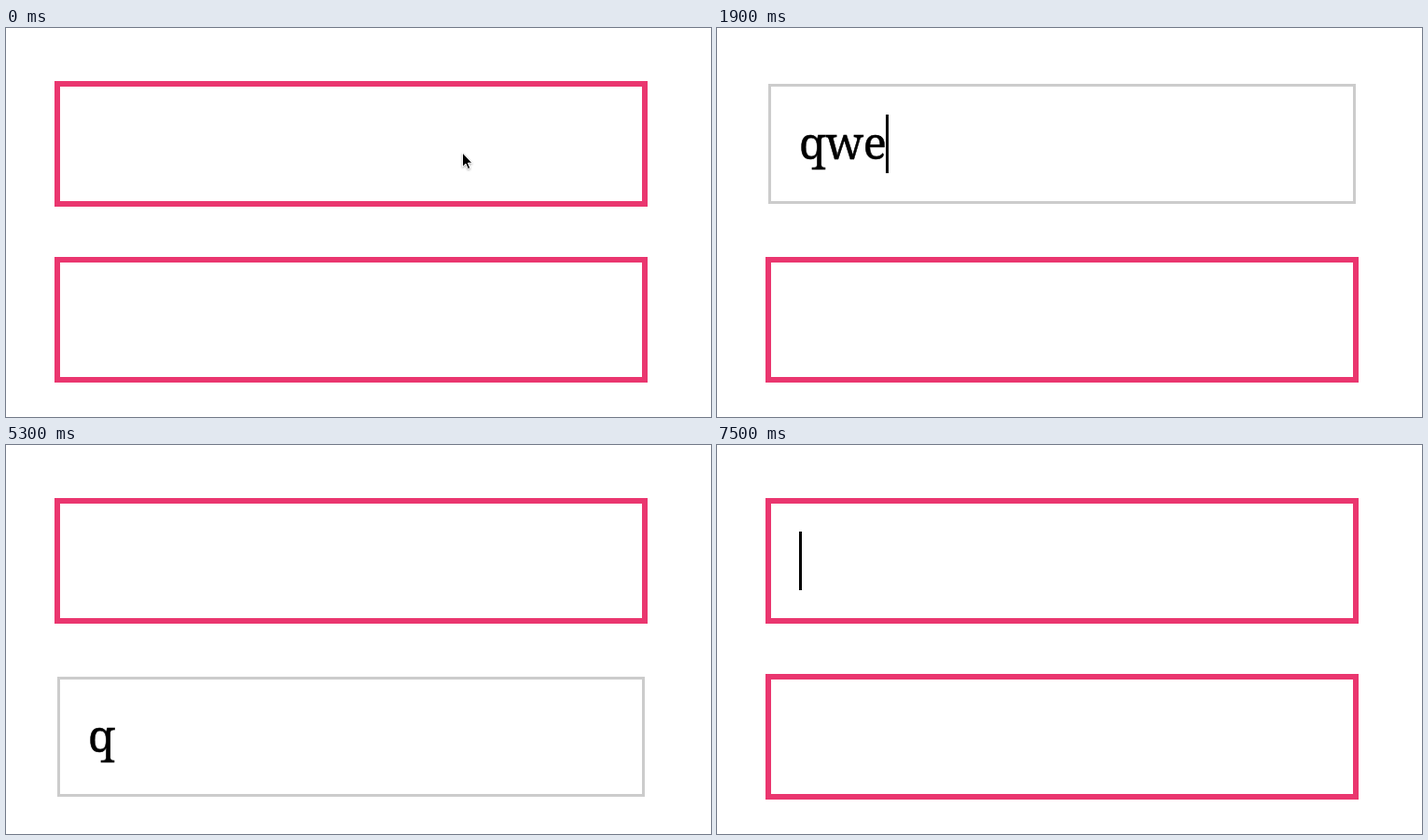
An HTML page that plays this animation: 756 px wide and 418 px high, repeating every 8000 ms.

```html
<!DOCTYPE html>
<html lang="en">
<head>
<meta charset="utf-8">
<title>Required fields</title>
<style>
  html, body { margin: 0; width: 100%; height: 100%; overflow: hidden; background: #fff; }
  .stage { position: relative; width: 756px; height: 418px; overflow: hidden; }
  .stage * { position: absolute; box-sizing: border-box; }

  /* 1.25% of the loop is 100 ms */
  .ring, .typed, .caret, .arrow, .beam, .tip { animation: 8s step-end infinite; }

  .field { left: 55px; width: 630px; height: 129px; border: 3px solid #ccc; }
  .first { top: 60px; }
  .second { top: 249px; }
  .ring { inset: -6px; border: 6px solid #ea366f; }
  .typed {
    left: 30px; top: 30px; width: 0; height: 63px; overflow: hidden;
    font: 47px/63px "Roboto Slab", "Noto Serif", serif;
    letter-spacing: -.3px; color: #000; white-space: pre;
    -webkit-text-stroke: .5px #000;
  }
  .typed span { left: 0; top: -1px; }
  .caret { left: 30px; top: 30px; width: 3px; height: 63px; background: #000; opacity: 0; }

  .first .ring { animation-name: ring1; }
  .first .typed { animation-name: type1; }
  .first .caret { animation-name: type1-caret, blink1; }
  .second .ring { animation-name: ring2; }
  .second .typed { animation-name: type2; }
  .second .caret { animation-name: type2-caret, blink2; }

  .arrow { left: 485px; top: 130px; animation-name: arrow; filter: drop-shadow(0 1px 1px #0005); }
  .beam { left: 496px; top: 128px; opacity: 0; animation-name: beam; }
  .tip {
    left: 500px; top: 154px; width: 136px; height: 21px; opacity: 0;
    background: #efefef; border: 1px solid #d2d2d2;
    box-shadow: 0 3px 7px #0004;
    font: 11px/19px Inter, sans-serif; color: #111; text-align: center; white-space: nowrap;
    animation-name: tip;
  }

  @keyframes ring1 {
    0%, 41.25%, 93.75% { opacity: 1 }
    22.5%, 81.25% { opacity: 0 }
  }
  @keyframes type1 {
    0%, 41.25%, 93.75% { width: 0 }
    22.5%, 92.5% { width: 29px }
    37.5%, 81.25%, 86.25% { width: 69px }
    23.75%, 82.5% { width: 93px }
  }
  @keyframes type1-caret {
    0%, 41.25%, 93.75% { left: 30px }
    22.5%, 92.5% { left: 59px }
    37.5%, 81.25%, 86.25% { left: 99px }
    23.75%, 82.5% { left: 123px }
  }
  @keyframes blink1 {
    0%, 8.75%, 21.25%, 30%, 42.5%, 51.25%, 87.5% { opacity: 0 }
    2.5%, 15%, 22.5%, 36.25%, 48.75%, 75%, 93.75%, 100% { opacity: 1 }
  }

  @keyframes ring2 {
    0%, 67.5% { opacity: 1 }
    58.75% { opacity: 0 }
  }
  @keyframes type2 {
    0%, 67.5% { width: 0 }
    58.75%, 66.25% { width: 29px }
    60%, 62.5% { width: 69px }
    61.25% { width: 93px }
  }
  @keyframes type2-caret {
    0%, 67.5% { left: 30px }
    58.75%, 66.25% { left: 59px }
    60%, 62.5% { left: 99px }
    61.25% { left: 123px }
  }
  @keyframes blink2 {
    0%, 57.5%, 66.25%, 75% { opacity: 0 }
    51.25%, 58.75%, 72.5% { opacity: 1 }
  }

  @keyframes arrow { 0% { opacity: 1 } 2.5%, 100% { opacity: 0 } }
  @keyframes beam {
    0% { opacity: 0; transform: none }
    2.5% { opacity: 1; transform: translate(1px, 2px) }
    3.75% { opacity: 1; transform: translate(-1px, 1px) }
    10% { opacity: 1; transform: translate(0, 1px) }
    11.25% { opacity: 1; transform: none }
    22.5%, 100% { opacity: 0; transform: none }
  }
  @keyframes tip { 0%, 22.5% { opacity: 0 } 21.25% { opacity: 1 } }
</style>
</head>
<body>
<div class="stage">
  <div class="field first">
    <div class="ring"></div>
    <div class="typed"><span>qwe</span></div>
    <div class="caret"></div>
  </div>
  <div class="field second">
    <div class="ring"></div>
    <div class="typed"><span>qwe</span></div>
    <div class="caret"></div>
  </div>
  <svg class="arrow" width="20" height="26">
    <path d="M4.500 4v15.200l3.500-3.300 2.400 5.600 2.400-1-2.400-5.400h4.600z" stroke="#fff"/>
  </svg>
  <svg class="beam" width="12" height="20" fill="none" stroke="#222" stroke-width="1.200">
    <path d="M2 1.500q3.500 0 3.500 2.500q0-2.500 3.500-2.500M5.500 4v11M2 17q3.500 0 3.500-2.500q0 2.500 3.500 2.500M3.500 10.500h4"/>
  </svg>
  <div class="tip">Please fill out this field.</div>
</div>
</body>
</html>
```
